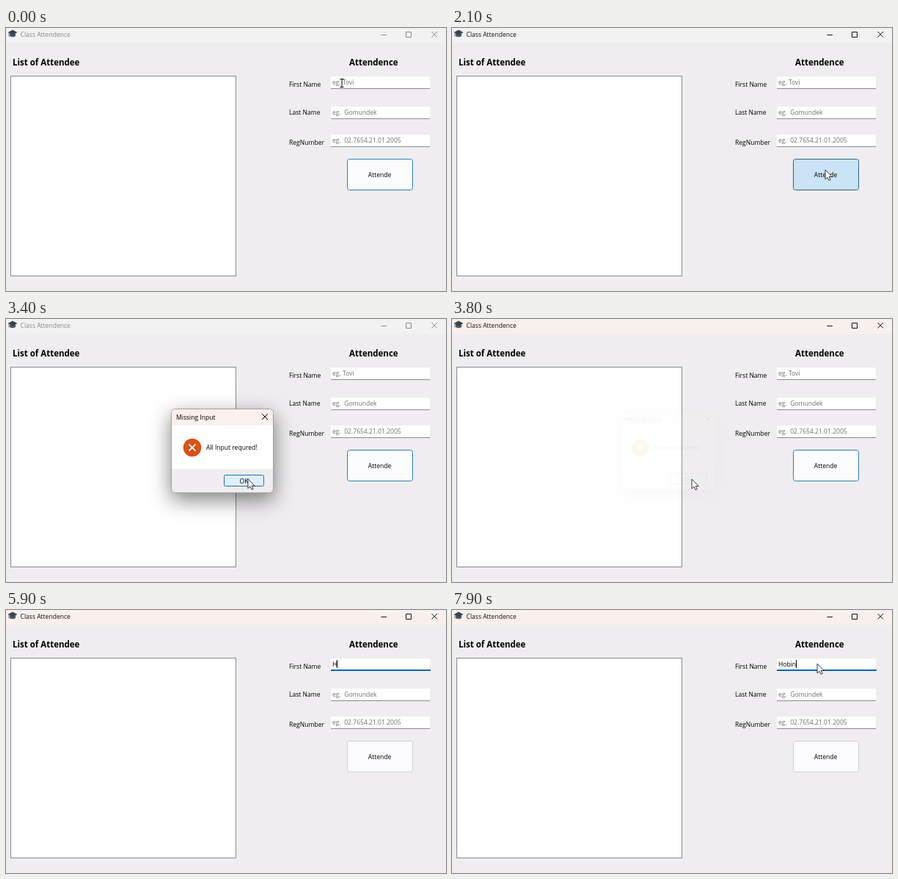
Write an HTML page that moves like this. It is 600 px wide and 358 px high and loops after 8000 ms.

```html
<!DOCTYPE html>
<html lang="en">
<head>
<meta charset="utf-8">
<title>Class Attendence</title>
<style>
  html, body { margin: 0; width: 100%; height: 100%; overflow: hidden; background: #efedef; }
  svg { display: block; width: 600px; height: 358px; font: 8.55px "Open Sans", "Noto Sans", sans-serif; }
  text { white-space: pre; }
  .head { font-size: 11.5px; font-weight: 700; }
  .hint { fill: #6e6e6e; }
  .line { fill: none; stroke: currentColor; }
  .mid { text-anchor: middle; }
  #dialog { transform-origin: 295px 179px; }
  #panel { filter: drop-shadow(0 9px 14px rgba(0, 0, 0, .5)); }
</style>
</head>
<body>
<svg viewBox="0 0 600 358">
  <rect width="600" height="358" fill="#efedef"/>

  <g id="titlebar">
    <rect id="bar" width="600" height="20"/>
    <path d="M5 7.5V11Q9 13.5 13 11V7.5z" fill="#4d5a61"/>
    <path d="M9 2.5L15.5 6L9 9.5L2.500 6z" fill="#37444b"/>
    <path d="M4 6.500V11.500" class="line" style="color:#66757d"/>
    <text x="19.500" y="12" fill="currentColor">Class Attendence</text>
    <path class="line" d="M511.500 9.500H519M545.500 5.500H552.500V12.500H545.500zM580.500 5L588 12.500M588 5L580.500 12.500"/>
  </g>

  <text class="head" x="9" y="51">List of Attendee</text>
  <rect x="6.500" y="65.500" width="307" height="272" fill="#fff" stroke="#858991"/>

  <text class="head" x="468" y="51">Attendence</text>
  <text x="386" y="80">First Name</text>
  <text x="386" y="118">Last Name</text>
  <text x="386" y="159">RegNumber</text>

  <g fill="#fff">
    <rect x="443" y="66" width="135" height="16"/>
    <rect x="443" y="107" width="135" height="16"/>
    <rect x="443" y="145" width="135" height="16"/>
  </g>
  <path class="line" style="color:#8b8b8d" d="M443 82.500H578M443 123.500H578M443 161.500H578"/>
  <rect id="focus" x="443" y="81" width="136" height="2" fill="#0a64b4"/>
  <text id="first" x="445" y="76.500"></text>
  <rect id="caret" y="68" width="1" height="11"/>
  <text class="hint" x="445" y="118">eg.  Gomundek</text>
  <text class="hint" x="445" y="156">eg.  02.7654.21.01.2005</text>

  <rect id="button" x="465.500" y="178.500" width="89" height="42" rx="3"/>
  <text class="mid" x="509.500" y="202.500">Attende</text>

  <g id="dialog">
    <rect id="panel" x="225.500" y="122.500" width="139" height="114" rx="5" fill="#efedef" stroke="#a5a1a3"/>
    <path d="M226 145V128Q226 123 231 123H359Q364 123 364 128V145z" fill="#faf0ed"/>
    <rect x="226" y="145" width="138" height="59" fill="#fff"/>
    <text x="232" y="136.500">Missing Input</text>
    <path class="line" d="M349 129L357 137M357 129L349 137"/>
    <circle cx="254" cy="175" r="12.300" fill="#dc5014"/>
    <path class="line" style="color:#fff" stroke-width="1.800" d="M249.500 170.500L258.500 179.500M258.500 170.500L249.500 179.500"/>
    <text x="273" y="178">All Input requred!</text>
    <rect id="ok" x="297.500" y="212.500" width="54" height="15" rx="2" stroke="#1c70b0"/>
    <text class="mid" x="324.500" y="223.500">OK</text>
  </g>

  <path id="arrow" d="M0 0V13L3 10.300L5 14.500L7.200 13.500L5.200 9.500H9.200z" fill="#fff" stroke="#222" stroke-width=".9"/>
  <path id="beam" class="line" d="M-2.500 -5.500H2.500M0 -5.500V5.500M-2.500 5.500H2.500"/>
</svg>
<script>
  const LOOP = 8000;
  const NAME = "Hobin";
  const PRESS = 2000, RELEASE = 2200, OPEN = 2300, CLOSE = 3620, FOCUS = 4800;
  const FIRST_KEY = 5800, KEY_GAP = 250;

  // Pointer stops: time, x, y
  const stops = [
    [200, 458, 75], [950, 397, 200], [1050, 397, 200], [1700, 509, 193],
    [2800, 509, 193], [3450, 327, 218], [3850, 327, 218], [4650, 458, 75],
    [7450, 458, 75], [7850, 498, 73]
  ];

  const el = id => document.getElementById(id);
  const set = (id, attrs) => {
    for (const key in attrs) el(id).setAttribute(key, attrs[key]);
  };
  const show = (id, on) => set(id, { visibility: on ? "visible" : "hidden" });
  const within = (t, from, to) => t >= from && t < to;
  const progress = (t, from, to) => Math.min(1, Math.max(0, (t - from) / (to - from)));
  const smooth = p => p * p * (3 - 2 * p);

  function pointerAt(t) {
    const next = stops.findIndex(s => s[0] > t);
    if (next === 0) return stops[0].slice(1);
    if (next < 0) return stops.at(-1).slice(1);
    const [t0, x0, y0] = stops[next - 1], [t1, x1, y1] = stops[next];
    const p = smooth(progress(t, t0, t1));
    return [x0 + (x1 - x0) * p, y0 + (y1 - y0) * p];
  }

  function drawButton(t, x, y) {
    const over = within(x, 465, 555) && within(y, 178, 221);
    let fill = "#fcfbfd", stroke = t < FOCUS ? "#2a7fb5" : "#cfcdcf";
    if (within(t, PRESS, RELEASE)) [fill, stroke] = ["#cae3f5", "#2b618c"];
    else if (over && !within(t, OPEN, CLOSE)) [fill, stroke] = ["#e0eef9", "#0078d4"];
    set("button", { fill, stroke });
  }

  function drawEntry(t) {
    const focused = t >= FOCUS;
    const typed = Math.min(NAME.length, Math.max(0, Math.floor((t - FIRST_KEY) / KEY_GAP) + 1));
    const first = el("first");
    first.textContent = focused ? NAME.slice(0, typed) : "eg. Tovi";
    first.setAttribute("class", focused ? "" : "hint");
    show("focus", focused);

    const lastKey = typed ? FIRST_KEY + (typed - 1) * KEY_GAP : FOCUS;
    show("caret", focused && (t - lastKey) % 1060 < 530);
    set("caret", { x: Math.round(445 + (typed ? first.getComputedTextLength() : 0)) });
  }

  function drawDialog(t, x, y) {
    const fadeIn = smooth(progress(t, OPEN, OPEN + 180));
    const fadeOut = (1 - progress(t, CLOSE, CLOSE + 230)) ** 2;
    const scale = t < CLOSE ? .92 + .08 * fadeIn : .93 + .07 * fadeOut;
    const alpha = fadeIn * fadeOut;
    const dialog = el("dialog");
    show("dialog", alpha > 0);
    dialog.style.opacity = alpha;
    dialog.style.transform = `scale(${scale})`;
    const over = within(x, 297, 352) && within(y, 212, 228);
    set("ok", { fill: over ? "#e0eef9" : "#fdfdfd" });
  }

  function draw(t) {
    const [x, y] = pointerAt(t);
    const active = within(t, PRESS, OPEN) || t >= CLOSE + 60;
    el("titlebar").style.color = active ? "#111" : "#8a8888";
    set("bar", { fill: active && t > CLOSE ? "#f9f0ee" : "#f3f2f3" });

    drawButton(t, x, y);
    drawEntry(t);
    drawDialog(t, x, y);

    const beam = within(x, 443, 579) && within(y, 66, 83) && t < FIRST_KEY;
    show("beam", beam);
    show("arrow", !beam && !within(t, FIRST_KEY, 7450));
    set(beam ? "beam" : "arrow", { transform: `translate(${x} ${y})` });
  }

  const start = performance.now();
  function tick() {
    draw((performance.now() - start) % LOOP);
    requestAnimationFrame(tick);
  }
  tick();
</script>
</body>
</html>
```
